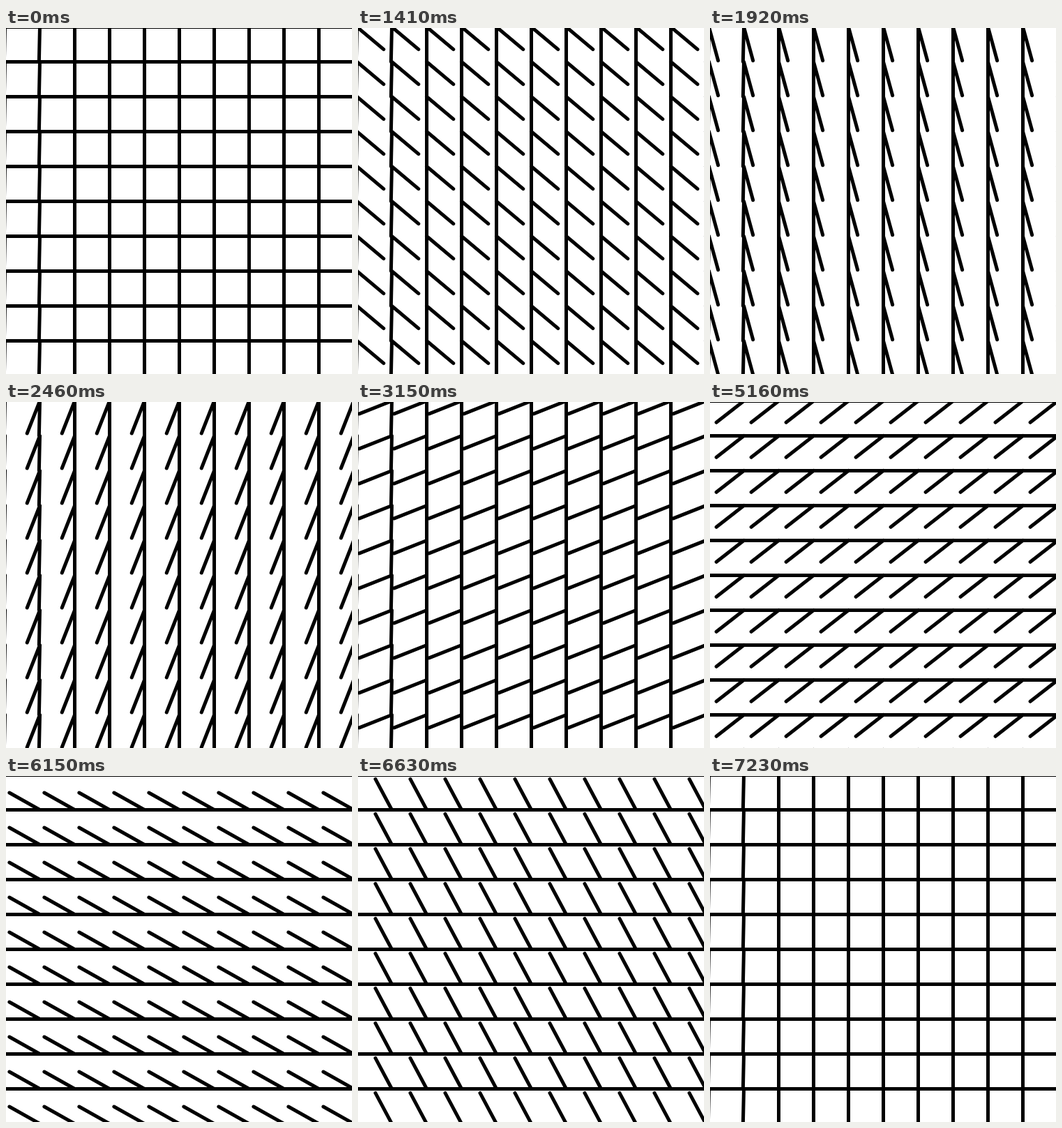
Animation, 496 px wide and 496 px high, one loop 7260 ms. Source, as an HTML page with a canvas:

```html
<!DOCTYPE html>
<html lang="en">
<head>
<meta charset="utf-8">
<title>Turning grid</title>
<style>
  html, body { margin: 0; width: 100%; height: 100%; overflow: hidden; background: #fff; }
  canvas { display: block; }
</style>
</head>
<body>
<canvas id="stage" width="496" height="496"></canvas>
<script>
const ctx = document.getElementById('stage').getContext('2d');
const LOOP = 7260;
const PITCH = 50, ORIGIN = -1.5, COUNT = 11;
const SPEED = 0.068;              // degrees per ms
const RAMP = 100;                 // half length of the soft start, ms
const SETTLE = 6;                 // degrees left when the slow-down begins
const HORIZONTAL_START = 822, VERTICAL_START = 4397;
const REST_LEAN = 1.3;            // the two left columns never stand quite upright

// Half turn: soft start, steady speed, exponential settling.
function turn(t) {
  if (t < -RAMP) return 0;
  if (t < RAMP) return SPEED * (t + RAMP) ** 2 / (4 * RAMP);
  const cruiseEnd = (180 - SETTLE) / SPEED;
  if (t < cruiseEnd) return SPEED * t;
  const left = SETTLE * Math.exp(-(t - cruiseEnd) * SPEED / SETTLE);
  return left < 0.3 ? 180 : 180 - left;
}

function addArm(x, y, degrees) {
  const a = degrees * Math.PI / 180;
  ctx.moveTo(x, y);
  ctx.lineTo(x + PITCH * Math.cos(a), y + PITCH * Math.sin(a));
}

function draw(time) {
  const horizontal = turn(time - HORIZONTAL_START);
  const vertical = turn(time - VERTICAL_START);
  const resting = vertical % 180 < REST_LEAN;

  ctx.fillStyle = '#fff';
  ctx.fillRect(0, 0, 496, 496);
  ctx.strokeStyle = '#000';
  ctx.lineWidth = 5;
  ctx.lineCap = 'round';
  ctx.beginPath();
  for (let col = 0; col < COUNT; col++) {
    const lean = resting && col < 2 ? REST_LEAN : vertical;
    for (let row = 0; row < COUNT; row++) {
      const x = ORIGIN + col * PITCH, y = ORIGIN + row * PITCH;
      addArm(x, y, horizontal);
      addArm(x, y, 90 + lean);
    }
  }
  ctx.stroke();
}

const start = performance.now();
function frame() {
  draw((performance.now() - start) % LOOP);
  requestAnimationFrame(frame);
}
frame();
</script>
</body>
</html>
```
